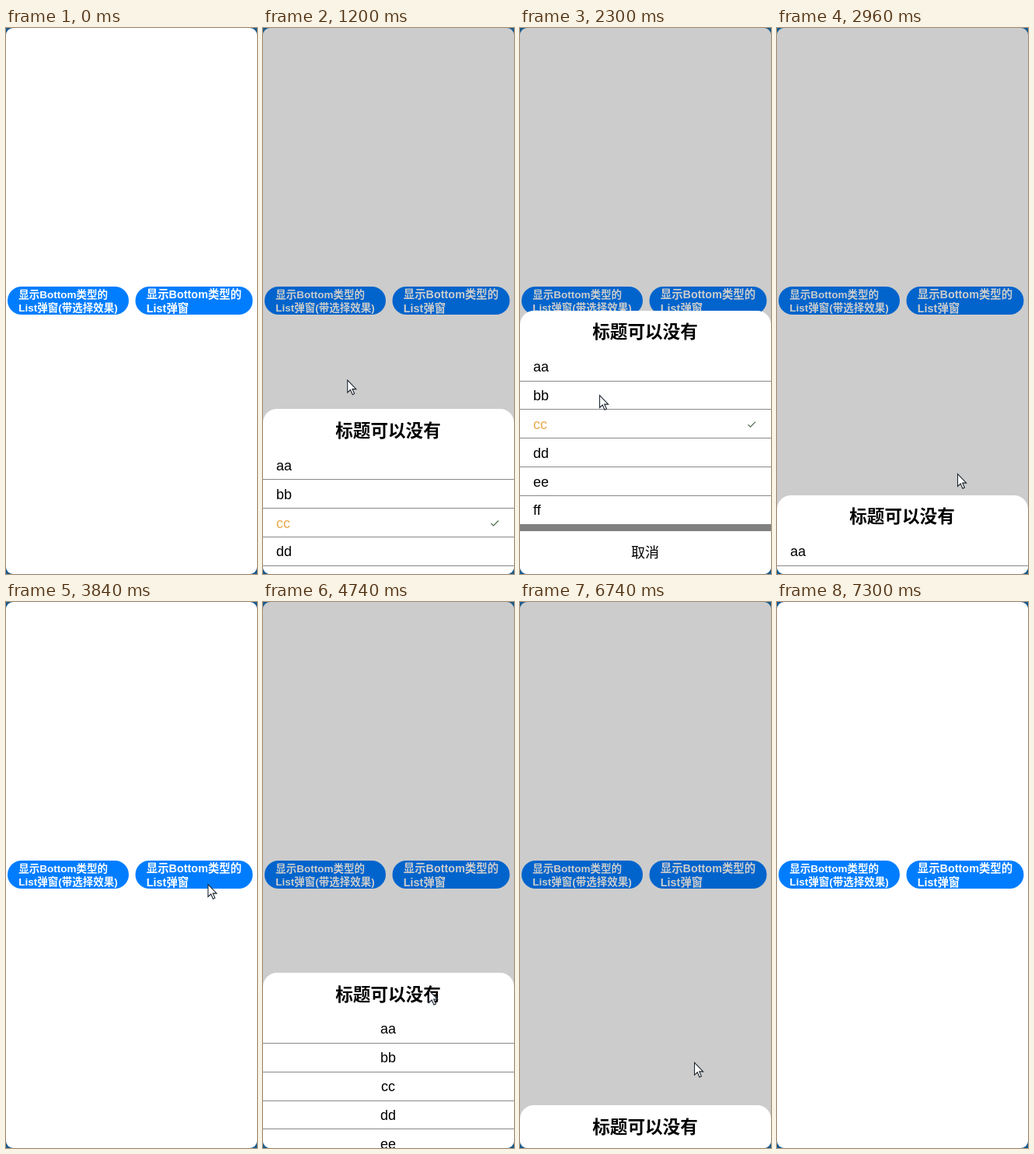
Animation, 323 px wide and 701 px high, one loop 7.95 s. Source, as an HTML page with a canvas:

```html
<!DOCTYPE html>
<html lang="zh">
<head>
<meta charset="utf-8">
<title>Bottom List</title>
<style>
html, body { margin: 0; height: 100%; overflow: hidden; background: #195a8c; }
canvas { display: block; width: 323px; height: 701px; }
</style>
</head>
<body>
<canvas></canvas>
<script>
const W = 323, H = 701, MID = W / 2, LOOP = 7950, STEP = 110;
const SLIDE = 800, SHEET = 338, ROW = 36.9;
const FONT = '"Liberation Sans", "Noto Sans CJK SC", "Noto Sans CJK", sans-serif';
const ARROW = new Path2D('M.5.5V16.5L4.2 13 7 19.2 9.4 18.1 6.7 12.1H11.6Z');
const canvas = document.querySelector('canvas');
const ctx = canvas.getContext('2d');
const scale = window.devicePixelRatio || 1;
canvas.width = W * scale;
canvas.height = H * scale;

const sheets = [
  { open: 900, close: 2607, selectable: true },
  { open: 4393, close: 6230, selectable: false },
];

// Where the pointer turns or rests
const stops = [
  { t: 110, x: 206, y: 690 },
  { t: 880, x: 80, y: 345 },
  { t: 1540, x: 136.5, y: 558 },
  { t: 2310, x: 102, y: 471 },
  { t: 2610, x: 102, y: 471 },
  { t: 2970, x: 232, y: 572 },
  { t: 3850, x: 259.5, y: 362 },
  { t: 4400, x: 257, y: 345 },
  { t: 4730, x: 213, y: 498 },
  { t: 5280, x: 184, y: 330 },
  { t: 5610, x: 211, y: 297 },
  { t: 5940, x: 199, y: 485 },
  { t: 6250, x: 199, y: 485 },
  { t: 7150, x: 248, y: 692 },
];

const clamp = v => Math.min(1, Math.max(0, v));
const easeOut = p => 1 - (1 - clamp(p)) ** 2;
const mix = (a, b, p) => a + (b - a) * p;

function text(str, x, y, size, color, weight = 400, align = 'left') {
  ctx.font = `${weight} ${size}px ${FONT}`;
  ctx.textAlign = align;
  ctx.fillStyle = color;
  ctx.fillText(str, x, Math.round(y));
}

function box(x, y, w, h, radii, color) {
  ctx.beginPath();
  ctx.roundRect(x, Math.floor(y), w, h, radii);
  ctx.fillStyle = color;
  ctx.fill();
}

function button(x, w, size, lineHeight, second) {
  box(x, 332, w, 36, 18, '#007dff');
  text('显示Bottom类型的', x + 14.3, 347, size, '#fff', 700);
  text(second, x + 14.3, 347 + lineHeight, size, '#fff', 700);
}

function check(y) {
  ctx.beginPath();
  ctx.moveTo(293.5, y - 5.5);
  ctx.lineTo(296.5, y - 2.5);
  ctx.lineTo(303, y - 9);
  ctx.strokeStyle = '#4c6b4c';
  ctx.lineWidth = 1.2;
  ctx.stroke();
}

function drawSheet(top, selectable) {
  box(0, top, W, H, [18, 18, 0, 0], '#fff');
  text('标题可以没有', MID - .5, top + 35.3, 22.6, '#000', 700, 'center');
  [...'abcdef'].forEach((c, i) => {
    const y = top + 77.9 + i * ROW;
    const chosen = selectable && c === 'c';
    text(c + c, selectable ? 17 : MID - .5, y, 18, chosen ? '#e8a94c' : '#000',
      400, selectable ? 'left' : 'center');
    if (i < 5) box(0, top + 90 + i * ROW, W, 1, 0, '#888');
    if (chosen) check(y);
  });
  box(0, top + 274.5, W, 9, 0, '#808080');
  text('取消', MID - .5, top + 317.3, 18, '#000', 400, 'center');
}

function drawPointer(t) {
  const i = stops.findIndex(s => s.t > t);
  if (i < 1) return;
  const a = stops[i - 1], b = stops[i];
  const p = (t - a.t) / (b.t - a.t);
  ctx.translate(mix(a.x, b.x, p), mix(a.y, b.y, p));
  ctx.fillStyle = '#fff';
  ctx.fill(ARROW);
  ctx.strokeStyle = '#1c2630';
  ctx.lineWidth = 1.1;
  ctx.stroke(ARROW);
}

function draw(t) {
  ctx.setTransform(scale, 0, 0, scale, 0, 0);
  ctx.fillStyle = '#195a8c';
  ctx.fillRect(0, 0, W, H);
  ctx.save();
  ctx.beginPath();
  ctx.roundRect(0, 0, W, H, 9);
  ctx.clip();
  box(0, 0, W, H, 0, '#fff');
  button(2, 156, 13.5, 16.8, 'List弹窗(带选择效果)');
  button(166.5, 151, 14.4, 18, 'List弹窗');
  for (const s of sheets) {
    if (t < s.open || t >= s.close + SLIDE) continue;
    box(0, 0, W, H, 0, 'rgba(0,0,0,.2)');
    const shown = easeOut((t - s.open) / SLIDE) - easeOut((t - s.close) / SLIDE);
    drawSheet(H - SHEET * shown, s.selectable);
  }
  drawPointer(t);
  ctx.restore();
}

// The screen refreshes about nine times a second
const start = performance.now();
function tick() {
  const t = Math.max(0, performance.now() - start) % LOOP;
  draw(Math.floor((t + 20) / STEP) * STEP);
  requestAnimationFrame(tick);
}
tick();
</script>
</body>
</html>
```
